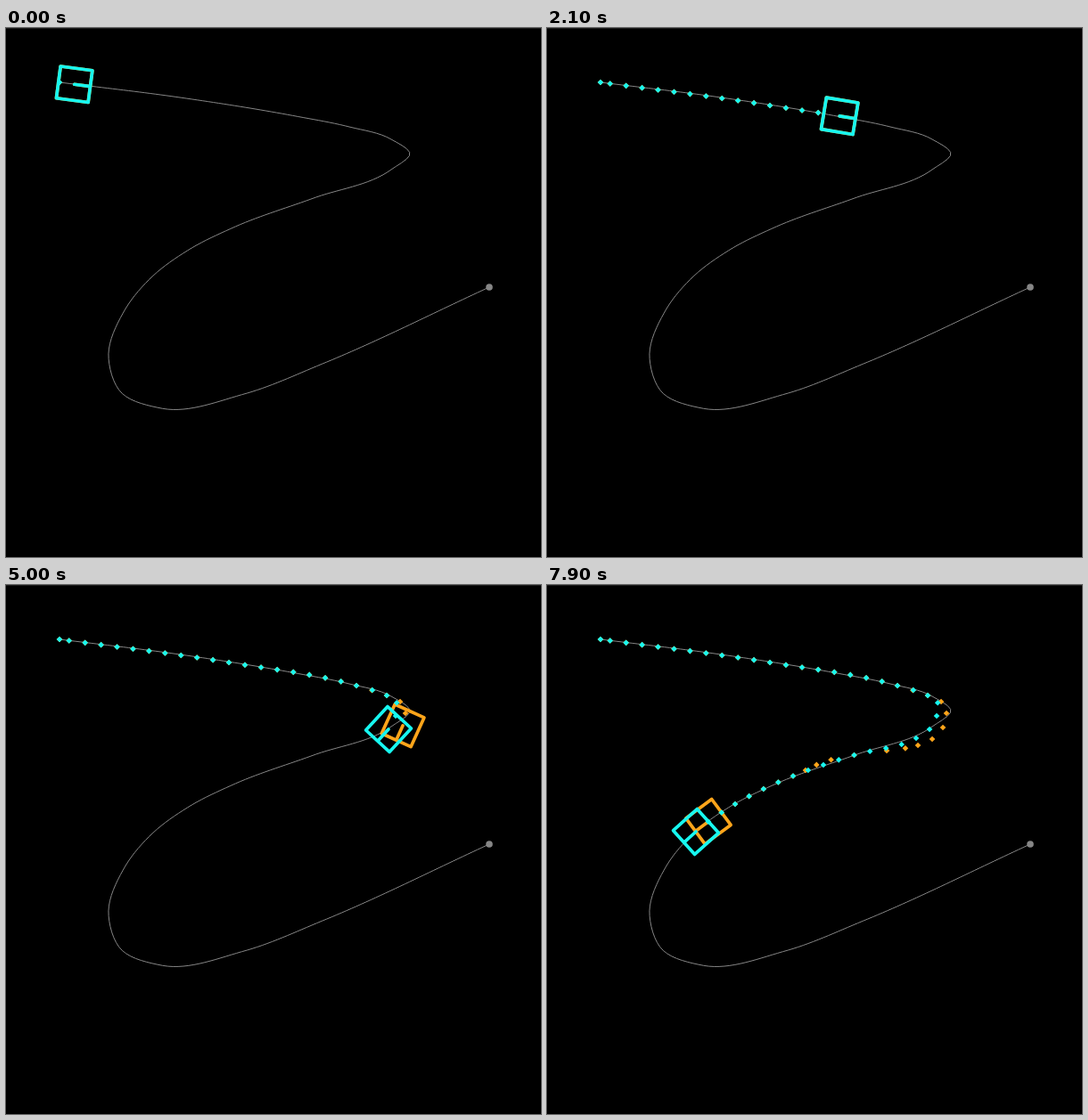
An HTML page with a canvas for the animation above (8000 ms loop, 600 px wide and 594 px high).

```html
<!DOCTYPE html>
<html lang="en">
<head>
<meta charset="utf-8">
<title>Path follower</title>
<style>
  html, body { margin: 0; width: 100%; height: 100%; overflow: hidden; background: #000; }
  canvas { display: block; }
</style>
</head>
<body>
<canvas id="stage" width="600" height="594"></canvas>
<script>
const ctx = document.getElementById('stage').getContext('2d');
const LOOP = 8, FPS = 10, HALF = 18, FIRST = 0.4;
const GRAY = '#868686', CYAN = '#17f7f0', ORANGE = '#ffa51a';

// All keys are [parameter, ...values]; trails count one unit per breadcrumb
const approach = [[FIRST, 60, 61], [11, 250, 87], [19, 393, 113], [21, 427, 124]];
const exit = [[29, 344.5, 191], [33, 276, 214.5], [37, 211, 246], [40, 167, 277], [43, 131, 318]];
const cyanTrail = [...approach,
  [21.8, 437, 130], [23, 437, 147], [24, 429, 162], [25, 414, 172], ...exit];
const orangeTrail = [...approach,
  [22, 442, 131], [23, 448, 144], [24, 444, 160], [25, 432, 173], [26, 416, 180], [28, 381, 186], ...exit];

// Seconds to breadcrumbs: steady, slow through the sharp turn, steady again
const pace = [[0, 1.33], [2.1, 15.33], [2.7, 19], [3.6, 21.7], [5, 24], [6.2, 29.7], [7.9, 40]];

const route = byLength([
  [60, 61], [195, 78], [325, 99], [385, 111], [432, 125], [453, 141], [432, 159],
  [345, 191], [255, 224], [205, 249], [162, 281], [133, 317], [115, 370],
  [128, 408], [174, 427], [267, 411], [355, 377], [542, 291]
]);

function byLength(points) {
  let s = 0;
  return points.map((p, i) => {
    if (i) s += Math.hypot(p[0] - points[i - 1][0], p[1] - points[i - 1][1]);
    return [s, ...p];
  });
}

// Smooth curve through unevenly spaced keys
function spline(keys, u) {
  const last = keys.length - 1;
  let i = 0;
  while (i < last - 1 && keys[i + 1][0] < u) i++;
  const chord = (k, d) => (keys[k + 1][d] - keys[k][d]) / (keys[k + 1][0] - keys[k][0]);
  const slope = (k, d) => {
    if (k === 0) return chord(0, d);
    if (k === last) return chord(last - 1, d);
    const before = keys[k][0] - keys[k - 1][0], after = keys[k + 1][0] - keys[k][0];
    return (chord(k - 1, d) * after + chord(k, d) * before) / (before + after);
  };
  const a = keys[i], b = keys[i + 1], h = b[0] - a[0], v = (u - a[0]) / h, w = 1 - v;
  return a.slice(1).map((_, n) => {
    const d = n + 1;
    return a[d] * w * w * (1 + 2 * v) + b[d] * v * v * (1 + 2 * w) +
      h * v * w * (slope(i, d) * w - slope(i + 1, d) * v);
  });
}

function drawRoute() {
  const end = route[route.length - 1];
  ctx.strokeStyle = ctx.fillStyle = GRAY;
  ctx.lineWidth = 1;
  ctx.beginPath();
  for (let s = 0; s < end[0]; s += 6) ctx.lineTo(...spline(route, s));
  ctx.lineTo(end[1], end[2]);
  ctx.stroke();
  ctx.beginPath();
  ctx.arc(end[1], end[2], 3.8, 0, Math.PI * 2);
  ctx.fill();
}

function drawCrumb([x, y]) {
  const r = 3.3;
  ctx.beginPath();
  ctx.moveTo(x - r, y);
  ctx.lineTo(x, y - r);
  ctx.lineTo(x + r, y);
  ctx.lineTo(x, y + r);
  ctx.fill();
}

function drawRobot(trail, pos, color) {
  ctx.strokeStyle = ctx.fillStyle = color;
  for (let i = 0; i <= pos - 0.5; i++) drawCrumb(spline(trail, Math.max(FIRST, i)));

  const [x, y] = spline(trail, pos);
  const [x0, y0] = spline(trail, pos - 0.05), [x1, y1] = spline(trail, pos + 0.05);
  ctx.save();
  ctx.translate(x, y);
  ctx.rotate(Math.atan2(y1 - y0, x1 - x0));
  ctx.lineWidth = 3.7;
  ctx.lineJoin = ctx.lineCap = 'round';
  ctx.beginPath();
  ctx.rect(-HALF, -HALF, HALF * 2, HALF * 2);
  ctx.moveTo(0, 0);
  ctx.lineTo(HALF, 0);
  ctx.stroke();
  ctx.restore();
}

function draw(seconds) {
  const t = Math.floor(seconds % LOOP * FPS) / FPS;
  const [pos] = spline(pace, t);
  const lag = Math.max(0, Math.min(1, (t - 4.7) / 2.1)); // orange loses ground on its wider turn
  ctx.fillStyle = '#000';
  ctx.fillRect(0, 0, 600, 594);
  ctx.fillStyle = '#1a1a1a';
  ctx.fillRect(0, 0, 600, 1);
  drawRoute();
  drawRobot(orangeTrail, pos - lag, ORANGE);
  drawRobot(cyanTrail, pos, CYAN);
}

const start = performance.now();
function tick() {
  draw((performance.now() - start) / 1000);
  requestAnimationFrame(tick);
}
tick();
</script>
</body>
</html>
```
